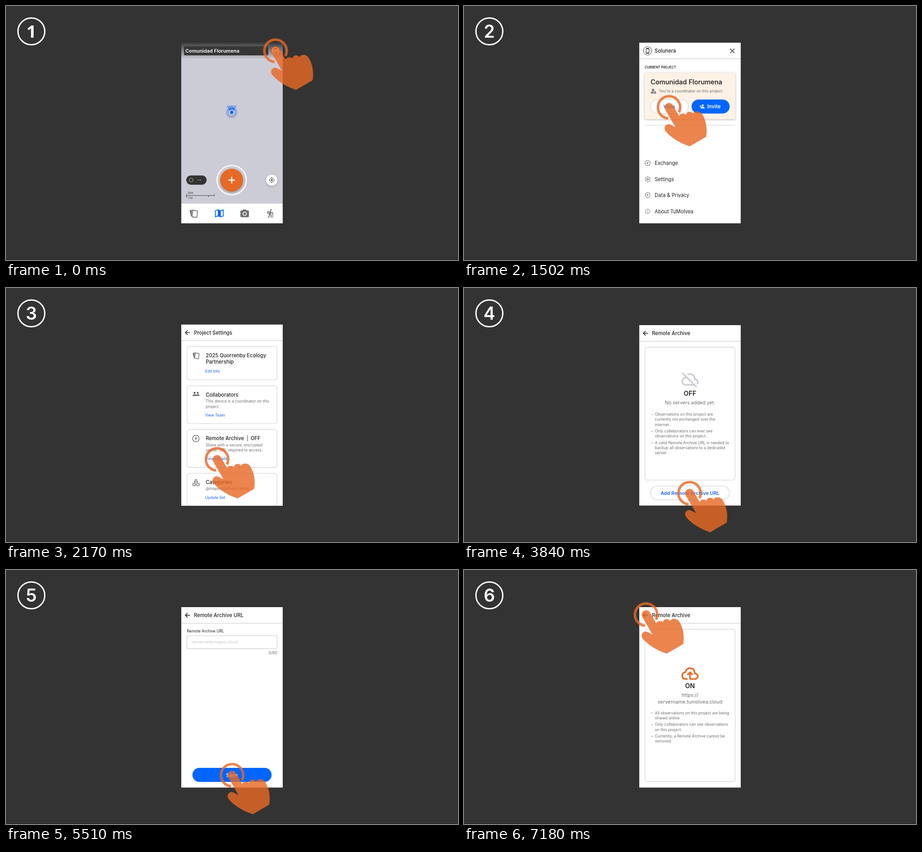
Recreate the animation shown at these times as an HTML page with a canvas. Size 998 by 561 pixels, loop 8 s.

```html
<!DOCTYPE html>
<html lang="en">
<head>
<meta charset="utf-8">
<title>Remote archive walkthrough</title>
<style>
html, body { margin: 0; width: 100%; height: 100%; overflow: hidden; background: #333; }
canvas { display: block; width: 998px; height: 561px; }
</style>
</head>
<body>
<canvas id="stage"></canvas>
<script>
const W = 998, H = 561, LOOP = 8000;
const STARTS = [0, 500, 2170, 3840, 5510, 7180];
const DARK = '#333', INK = '#222', GRAY = '#6e6e6e', LINE = '#d0d0d6', MIST = '#ccccd6';
const BLUE = '#0066ff', LINK = '#1a63f0', ORANGE = '#e86826';
const LEFT = 387, WIDTH = 224, MID = 499;

const canvas = document.getElementById('stage');
const ctx = canvas.getContext('2d');
const dpr = window.devicePixelRatio || 1;
canvas.width = W * dpr;
canvas.height = H * dpr;

const PATHS = {
  hiker: new Path2D('M13.5 5.5c1.1 0 2-.9 2-2s-.9-2-2-2-2 .9-2 2 .9 2 2 2zm4 5.28c-1.23-.37-2.22-1.17-2.8-2.18l-1-1.6c-.41-.65-1.11-1-1.84-1-.78 0-1.59.5-1.78 1.44S7 23 7 23h2.1l1.8-8 2.1 2v6h2v-7.5l-2.1-2 .6-3c1 1.15 2.41 2.01 4 2.34V23H19V9h-1.5v1.78zM7.43 13.13l-2.12-.41c-.54-.11-.9-.63-.79-1.17l.76-3.93c.21-1.08 1.26-1.79 2.34-1.58l1.16.23z'),
  camera: new Path2D('M9 3 7.2 5H4c-1.1 0-2 .9-2 2v12c0 1.1.9 2 2 2h16c1.1 0 2-.9 2-2V7c0-1.1-.9-2-2-2h-3.2L15 3z'),
  cloudOff: new Path2D('M792-56 686-160H260q-92 0-156-64T40-380q0-77 47.5-137T210-594q3-8 6-15.5t6-16.5L56-792l56-56 736 736-56 56ZM260-240h346L284-562q-2 11-3 21t-1 21h-20q-58 0-99 41t-41 99q0 58 41 99t99 41ZM864-210l-58-56q17-14 25.5-32.5T840-340q0-42-29-71t-71-29h-60v-80q0-83-58.5-141.5T480-720q-27 0-52 6.5T380-693l-58-58q35-24 74.5-36.5T480-800q117 0 198.5 81.5T760-520q69 8 114.5 59.5T920-340q0 39-15 72.5T864-210Z'),
  cloudUp: new Path2D('M260-160q-91 0-155.5-63T40-377q0-78 47-139t123-78q25-92 100-149t170-57q117 0 198.5 81.5T760-520q69 8 114.5 59.5T920-340q0 75-52.5 127.5T740-160H520q-33 0-56.5-23.5T440-240v-206l-64 62-56-56 160-160 160 160-56 56-64-62v206h220q42 0 71-29t29-71q0-42-29-71t-71-29h-60v-80q0-83-58.5-141.5T480-720q-83 0-141.5 58.5T280-520h-20q-58 0-99 41t-41 99q0 58 41 99t99 41h100v80H260Z'),
  hand: new Path2D('M-8.4 4.85A9.7 9.7 0 0 1 8.4-4.85L22.4 19.4C24 13.5 33.5 12.5 37.5 17C38 8.5 49 8 53 14C56 7.5 68 7 73 15C79 24 86 42 82 65L46 86C30 82 5 68-6 54.5C-15 45-6 34 3 38.2L14.1 43.8Z')
};

function at(x, y, scale, draw) {
  ctx.save();
  ctx.translate(x, y);
  ctx.scale(scale, scale);
  draw();
  ctx.restore();
}

function fill(color, path, rule) {
  ctx.fillStyle = color;
  path ? ctx.fill(path, rule || 'nonzero') : ctx.fill();
}

function stroke(color, width) {
  ctx.strokeStyle = color;
  ctx.lineWidth = width;
  ctx.stroke();
}

function disc(x, y, r, color, edge, width = 1) {
  ctx.beginPath();
  ctx.arc(x, y, r, 0, Math.PI * 2);
  if (color) fill(color);
  if (edge) stroke(edge, width);
}

function box(x, y, w, h, r, color, edge, width = 1) {
  ctx.beginPath();
  ctx.roundRect(x, y, w, h, r);
  if (color) fill(color);
  if (edge) stroke(edge, width);
}

function line(points, color, width, closed) {
  ctx.beginPath();
  points.forEach(([x, y]) => ctx.lineTo(x, y));
  if (closed) ctx.closePath();
  stroke(color, width);
}

function poly(points, color) {
  ctx.beginPath();
  points.forEach(([x, y]) => ctx.lineTo(x, y));
  fill(color);
}

function withShadow(blur, dy, draw) {
  ctx.save();
  ctx.shadowColor = 'rgba(0,0,0,.3)';
  ctx.shadowBlur = blur * dpr;
  ctx.shadowOffsetY = dy * dpr;
  draw();
  ctx.restore();
}

// y is the middle of the capitals
function text(s, x, y, size = 8.5, color = GRAY, weight = 400, align = 'left', family = 'Inter') {
  ctx.font = `${weight} ${size}px ${family}, sans-serif`;
  ctx.textAlign = align;
  ctx.fillStyle = color;
  ctx.fillText(s, x, y + size * .363);
}

const title = (s, x, y, size = 11.2) => text(s, x, y, size, INK, 500);
const link = (s, y) => text(s, 439.8, y, 8.45, LINK);

function lines(rows, x, ys) {
  rows.forEach((s, i) => text(s, x, ys[i]));
}

function bullets(items, x = 421.5) {
  for (const [y, ...rows] of items) {
    disc(415.2, y + .5, 1, GRAY);
    lines(rows, x, [y, y + 11.2, y + 22.5]);
  }
}

// Icons

function cards(x, y, s) {
  at(x, y, s, () => {
    poly([[-9.6, -6.5], [-1.5, -8.6], [-1, -7], [-4.4, -6.2], [-5.2, 7], [-6.6, 6.4]], GRAY);
    ctx.rotate(.13);
    box(-3.2, -6.4, 10.6, 14.6, 1.4, null, GRAY, 1.7);
  });
}

function mapIcon(x, y) {
  at(x, y, 1, () => {
    line([[-8.6, -5.8], [-3.2, -7.8], [3.2, -5.6], [8.6, -7.6], [8.6, 5.8], [3.2, 7.8], [-3.2, 5.6], [-8.6, 7.6]], BLUE, 1.8, true);
    poly([[-3.2, -7.8], [3.2, -5.6], [3.2, 7.8], [-3.2, 5.6]], BLUE);
  });
}

function bolt(x, y, r, width) {
  disc(x, y, r, null, GRAY, width);
  at(x, y, r / 7, () => poly([[1.6, -4.4], [-3, .9], [-.5, .9], [-1.5, 4.4], [3, -1], [.5, -1]], GRAY));
}

function device(x, y) {
  disc(x, y, 9.2, '#fff', DARK, 1);
  box(x - 3.7, y - 6, 7.4, 12, 1.5, INK);
  box(x - 2.6, y - 4, 5.2, 8, 0, '#fff');
}

function gear(x, y, r, color, solid) {
  ctx.beginPath();
  for (let i = 0; i < 24; i++) {
    const a = (i - .5) * Math.PI / 12;
    const d = i % 4 < 2 ? r : r * .75;
    ctx.lineTo(x + d * Math.sin(a), y - d * Math.cos(a));
  }
  ctx.closePath();
  solid ? fill(color) : stroke(color, 1);
}

function person(x, y, s, color) {
  at(x, y, s, () => {
    disc(0, -2.8, 2.6, color);
    box(-5, .8, 10, 4, [4, 4, 0, 0], color);
  });
}

function shield(x, y) {
  at(x, y, 1, () => {
    ctx.beginPath();
    ctx.moveTo(0, -6);
    ctx.lineTo(4.8, -4.2);
    ctx.lineTo(4.8, 0);
    ctx.quadraticCurveTo(4.4, 4.4, 0, 6);
    ctx.quadraticCurveTo(-4.4, 4.4, -4.8, 0);
    ctx.lineTo(-4.8, -4.2);
    ctx.closePath();
    stroke(GRAY, 1.1);
    disc(0, -1.2, 1.3, GRAY);
    line([[0, -1], [0, 2.6]], GRAY, 1.1);
  });
}

function backArrow(y) {
  line([[406, y], [396, y]], INK, 1.6);
  line([[401, y - 5], [396, y], [401, y + 5]], INK, 1.6);
}

// Shared parts

function badge(n) {
  disc(56, 56, 29.6, null, '#fff', 3);
  if (n === 1) text('1', 56, 56, 38, '#fff', 700, 'center', '"Open Sans"');
  else text(n, 56, 56, 39, '#fff', 600, 'center');
}

function tap(x, y) {
  ctx.save();
  ctx.globalAlpha = .81;
  ctx.translate(x, y);
  fill(ORANGE, PATHS.hand);
  ctx.beginPath();
  ctx.arc(0, 0, 24.6, 95 * Math.PI / 180, 387 * Math.PI / 180);
  stroke(ORANGE, 5.6);
  ctx.restore();
}

function page(top, bottom, heading) {
  box(LEFT, top, WIDTH, bottom - top, 0, '#fff');
  const rule = top + 35.6;
  line([[LEFT, rule], [LEFT + WIDTH, rule]], LINE, 1.2);
  if (heading) {
    backArrow(top + 18);
    title(heading, 415, top + 18);
  }
}

// Screens

function mapScreen() {
  box(LEFT, 81, WIDTH, 399, 0, MIST);
  const shade = ctx.createLinearGradient(0, 81, 0, 117);
  shade.addColorStop(0, 'rgba(51,51,51,.95)');
  shade.addColorStop(1, 'rgba(51,51,51,0)');
  box(LEFT, 81, WIDTH, 36, 0, shade);
  box(393, 89, 186, 20, 3, '#363637');
  text('Comunidad Florumena', 396, 99, 10.9, '#fff', 600);
  device(595, 99);

  disc(498.3, 235, 12.5, 'rgba(60,90,200,.3)');
  const beam = ctx.createLinearGradient(0, 218, 0, 235);
  beam.addColorStop(0, 'rgba(0,102,255,.15)');
  beam.addColorStop(1, 'rgba(0,102,255,1)');
  poly([[486.8, 219], [509.8, 219], [501.5, 235], [495, 235]], beam);
  disc(498.3, 235, 5.6, '#fff');
  disc(498.3, 235, 4, BLUE);

  disc(498.3, 384.5, 32.4, null, '#fff', 2.4);
  withShadow(4, 2, () => disc(498.3, 384.5, 25.2, ORANGE));
  line([[491, 384.5], [505.6, 384.5]], '#fff', 2.5);
  line([[498.3, 377.2], [498.3, 391.8]], '#fff', 2.5);

  box(398, 374.3, 45, 20.4, 10.2, DARK);
  for (let i = 0; i < 12; i++) {
    const a = i * Math.PI / 6, c = Math.cos(a), s = Math.sin(a);
    line([[409 + 3.4 * c, 384.4 + 3.4 * s], [409 + 5 * c, 384.4 + 5 * s]], '#fff', .9);
  }
  text('--', 427, 384, 9.5, '#fff', 400, 'center');

  withShadow(4, 1, () => disc(586.8, 384.7, 12.6, '#fff'));
  at(586.8, 384.7, 1, () => {
    disc(0, 0, 4.6, null, '#555', 1.1);
    disc(0, 0, 2.1, '#555');
    for (let i = 0; i < 4; i++) {
      line([[4.6, 0], [6.6, 0]], '#555', 1.1);
      ctx.rotate(Math.PI / 2);
    }
  });

  text('2km', 401, 413, 6.2, DARK);
  text('1 mi', 401, 423.6, 6.2, DARK);
  line([[398.4, 414.8], [398.4, 423.5]], DARK, .9);
  line([[398.4, 418.6], [460.4, 418.6], [460.4, 415.4]], DARK, .9);
  line([[447.4, 418.6], [447.4, 421.8]], DARK, .9);

  box(LEFT, 436.5, WIDTH, 43.5, 0, '#fff');
  cards(415, 458, 1);
  mapIcon(471, 458);
  at(527, 458, .94, () => {
    ctx.translate(-12, -12);
    fill(GRAY, PATHS.camera);
    disc(12, 13, 4.1, null, '#fff', 1.9);
  });
  at(583.5, 458, .88, () => {
    ctx.translate(-12, -12);
    fill(GRAY, PATHS.hiker);
  });
  tap(595, 99);
}

function menuScreen() {
  page(81, 480);
  device(405.3, 99);
  title('Solunera', 421, 99.3, 11.1);
  line([[587.8, 94.4], [597.2, 103.8]], '#555', 1.8);
  line([[597.2, 94.4], [587.8, 103.8]], '#555', 1.8);
  text('CURRENT PROJECT', 399, 135, 7.15, INK, 600);

  withShadow(4, 1, () => box(399, 147.5, 200, 102.5, 3, '#fef2e7'));
  text('Comunidad Florumena', 412, 168, 14.6, '#111', 500);
  person(417.3, 188.2, 1, GRAY);
  disc(421.4, 191, 3.7, '#fef2e7');
  gear(421.4, 191, 3.2, GRAY, true);
  disc(421.4, 191, 1, '#fef2e7');
  text('You’re a coordinator on this project.', 430.5, 188.4, 8.45);
  box(411.8, 206.8, 83.6, 30.6, 15.3, '#fff', MIST);
  text('View', 453.3, 222, 10.9, BLUE, 600, 'center');
  box(502.5, 206.5, 84, 31, 15.5, BLUE);
  person(527, 222, .9, '#fff');
  line([[520, 221.2], [524.4, 221.2]], '#fff', 1.1);
  line([[522.2, 219], [522.2, 223.4]], '#fff', 1.1);
  text('Invite', 537, 222, 11.2, '#fff', 600);
  line([[399, 263.5], [599, 263.5]], LINE, 1.1);

  const items = ['Exchange', 'Settings', 'Data & Privacy', 'About TuMolvea'];
  items.forEach((s, i) => text(s, 421, 347 + i * 35.55, 11.1, INK));
  bolt(405.4, 347, 5.8, 1.1);
  gear(405.4, 382.5, 6, GRAY);
  disc(405.4, 382.5, 1.9, null, GRAY, 1.2);
  shield(405.4, 418);
  disc(405.4, 453.6, 4.9, null, GRAY, 1);
  line([[405.4, 453], [405.4, 456.2]], GRAY, 1);
  disc(405.4, 451.4, .65, GRAY);
  tap(452.7, 223.8);
}

function settingsScreen() {
  ctx.save();
  ctx.beginPath();
  ctx.rect(LEFT, 80.5, WIDTH, 400.5);
  ctx.clip();
  page(80.5, 481, 'Project Settings');
  for (const [y, h] of [[129.3, 73.4], [216, 83.5], [312.8, 83.3], [409.3, 72.2]]) {
    box(399.8, y, 198.6, h, 5, null, LINE, 1.1);
  }
  cards(420, 149, .82);
  title('2025 Quorrenby Ecology', 441, 149);
  title('Partnership', 441, 163.2);
  link('Edit Info', 184);

  person(423.2, 234.2, .85, GRAY);
  disc(416.3, 231.2, 3.3, '#fff');
  person(416.3, 234.2, .92, GRAY);
  title('Collaborators', 441, 235.6);
  lines(['This device is a coordinator on this', 'project.'], 441, [250.4, 261.6]);
  link('View Team', 280.8);

  bolt(419.3, 332.4, 7.2, 1.5);
  title('Remote Archive', 441, 332);
  text('|', 533.6, 331.5, 11.2, INK, 400, 'center');
  title('OFF', 540, 332);
  lines(['Share with a secure, encrypted', 'server. URL required to access.'], 441, [347, 358]);
  link('View Details', 377.3);

  line([[419.3, 422.6], [423, 428.4], [415.6, 428.4]], GRAY, 1.5, true);
  box(412.8, 431.6, 5, 5, 0, null, GRAY, 1.5);
  disc(423.8, 434, 3, null, GRAY, 1.5);
  title('Categories', 441, 429);
  text('@mapeo/default-config', 441, 443.4);
  link('Update Set', 462.7);
  ctx.restore();
  tap(466, 378.6);
}

function offScreen() {
  page(82, 480.5, 'Remote Archive');
  box(399.6, 130.6, 199, 293.6, 5, null, LINE, 1.1);
  at(MID, 202, .0432, () => {
    ctx.translate(-480, 480);
    fill(MIST, PATHS.cloudOff, 'evenodd');
  });
  text('OFF', MID, 233, 14.3, INK, 600, 'center');
  text('No servers added yet.', MID, 253.6, 10.65, GRAY, 400, 'center');
  bullets([
    [279, 'Observations on this project are', 'currently not exchanged over the', 'internet.'],
    [316, 'Only collaborators can ever see', 'observations on this project.'],
    [341.5, 'A valid Remote Archive URL is needed to', 'backup all observations to a dedicated', 'server.']
  ]);
  box(412, 437.2, 174, 30.6, 15.3, '#fff', MIST, 1.1);
  text('Add Remote Archive URL', MID, 452.8, 10.8, LINK, 600, 'center');
  tap(498, 453.3);
}

function urlScreen() {
  page(82, 480.5, 'Remote Archive URL');
  text('Remote Archive URL', 399.2, 135.3, 8.5, INK);
  box(399.6, 145, 199, 28.6, 2, null, MIST, 1.1);
  text('servername.mapeo.cloud', 409, 159.2, 8.5, '#c6c6cc');
  text('0/60', 599, 183, 8.7, GRAY, 400, 'right');
  box(411.6, 437, 174.8, 31, 15.5, BLUE);
  text('Save', MID, 452.8, 10.8, '#fff', 600, 'center');
  tap(499.2, 453.3);
}

function onScreen() {
  page(82, 480.5, 'Remote Archive');
  box(399.6, 130.6, 199, 337, 5, null, LINE, 1.1);
  at(MID, 228.8, .0432, () => {
    ctx.translate(-480, 480);
    fill(ORANGE, PATHS.cloudUp);
  });
  text('ON', MID, 255.6, 14, INK, 600, 'center');
  text('https://', MID, 276, 10.9, GRAY, 400, 'center');
  text('servername.tumolvea.cloud', MID, 290.6, 10.9, GRAY, 400, 'center');
  bullets([
    [315.6, 'All observations on this project are being', 'shared online.'],
    [341.3, 'Only collaborators can see observations', 'on this project.'],
    [366.8, 'Currently, a Remote Archive cannot be', 'removed.']
  ]);
  tap(402, 98.6);
}

const SCREENS = [mapScreen, menuScreen, settingsScreen, offScreen, urlScreen, onScreen];
const begin = performance.now();
let shown = -1;

function render(now) {
  const t = Math.max(0, now - begin) % LOOP;
  const step = STARTS.filter(s => s <= t).length - 1;
  if (step !== shown) {
    shown = step;
    ctx.setTransform(dpr, 0, 0, dpr, 0, 0);
    box(0, 0, W, H, 0, DARK);
    box(0, 560, W, 1, 0, '#1f1f1f');
    badge(step + 1);
    SCREENS[step]();
  }
  requestAnimationFrame(render);
}
render(begin);
</script>
</body>
</html>
```
